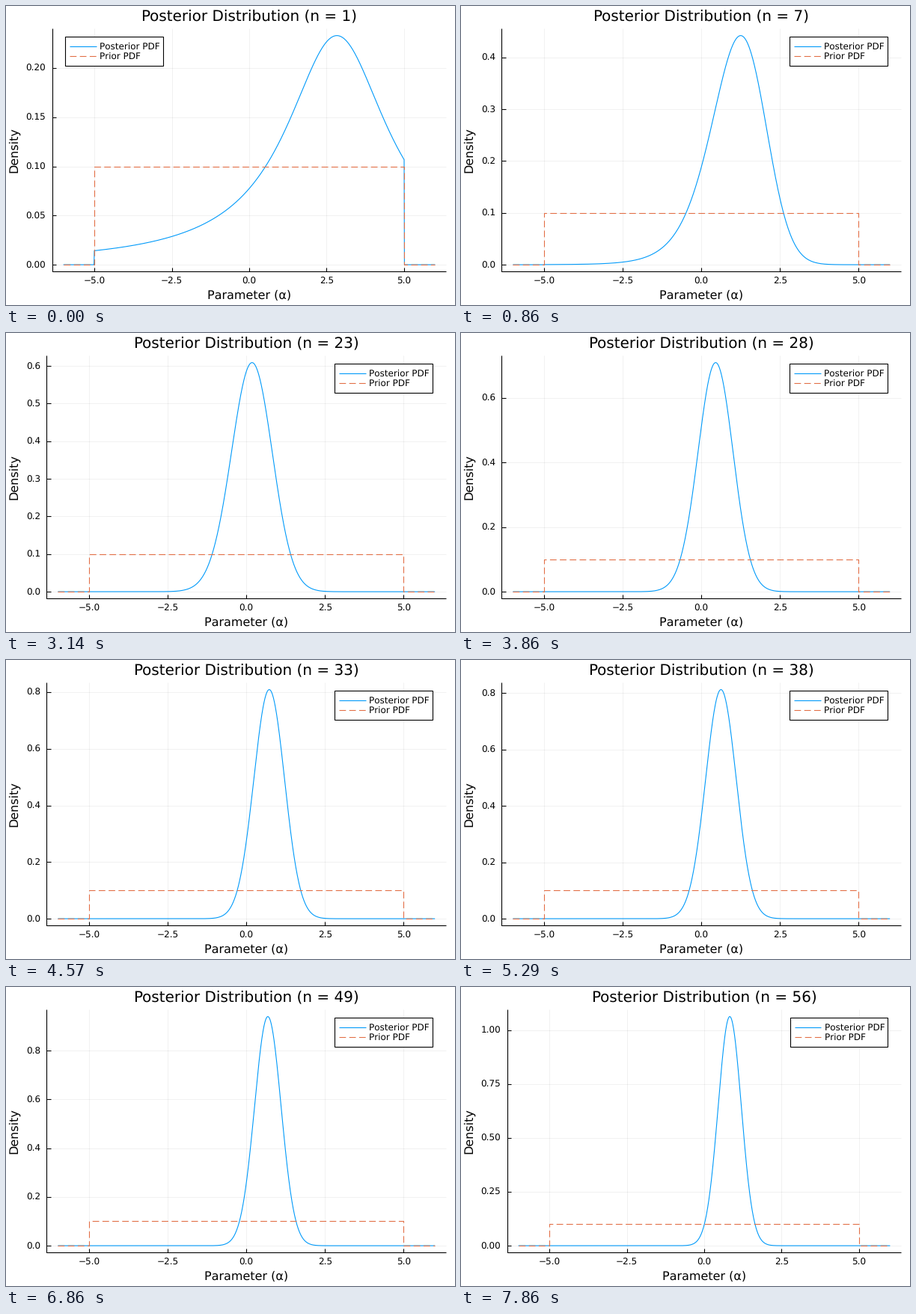
These frames come from a looping animation (600 by 400 pixels, 8000 ms). A matplotlib script:

```python
import numpy as np
import matplotlib as mpl
import matplotlib.pyplot as plt
from matplotlib.animation import FuncAnimation
from matplotlib.patches import Rectangle

W, H, DPI = 600, 400, 100
TICK_MS, TICKS = 50, 160
RATE = 7  # observations per second
TOP, BOTTOM, RIGHT = 30.4, 355.3, 588.3
PAD = 0.03
BLUE, ORANGE = "#009AFA", "#E26F46"
DASH = (0, (8, 4))

# where the posterior peaks after some of the observations
SEEN = [1, 7, 15, 23, 33, 42, 56]
MODE = [2.83, 1.25, 0, 0.18, 0.727, 0.54, 0.825]
PEAK = [0.233, 0.442, 0.652, 0.609, 0.809, 0.816, 1.063]

X = np.linspace(-6, 6, 1201)
INSIDE = np.abs(X) < 5.0001

mpl.rcParams["font.family"] = "DejaVu Sans"
mpl.rcParams["text.hinting"] = "none"
mpl.rcParams["text.hinting_factor"] = 1

fig = plt.figure(figsize=(W / DPI, H / DPI), dpi=DPI, facecolor="white")
ax = fig.add_axes([0, 0, 1, 1])


def pt(px):
    return px * 72 / DPI


def line(x, y, color="black", width=1.1, **kw):
    kw.setdefault("solid_capstyle", "butt")
    ax.plot(x, y, color=color, lw=pt(width), **kw)


def text(x, y, s, px=11.8, ha="center", **kw):
    ax.text(x, y, s, fontsize=pt(px), ha=ha, va="baseline", **kw)


def posterior(n):
    """Heavy-tailed density on [-5, 5], scaled to the wanted peak."""
    mode, peak = np.interp(n, SEEN, MODE), np.interp(n, SEEN, PEAK)
    skew = 3.4 * (n - 1) / n ** 2.5
    d = X - mode
    shape = d ** 2 * np.exp(skew * d)
    tail = 2 * n - 1
    a = 0.25
    for _ in range(40):
        p = np.where(INSIDE, (1 + a * shape / tail) ** -tail, 0)
        p /= p.sum() * (X[1] - X[0])
        a *= (peak / p.max()) ** 2
    return p, mode


def tick_step(upper):
    """Weigh a count near five against the roundness of the step."""
    cost = {0.25: 5, 0.2: 3, 0.1: 0, 0.05: 1}
    return min(cost, key=lambda s: cost[s] + 2 * abs(int(upper / s) - 4))


def legend(left):
    y = TOP + (BOTTOM - TOP) / 30 - 0.3
    ax.add_patch(Rectangle((left, y), 130.5, 39, fc="white", ec="black",
                           lw=pt(1.1), zorder=5))
    rows = [("Posterior PDF", BLUE, "-"), ("Prior PDF", ORANGE, DASH)]
    for i, (name, color, style) in enumerate(rows, 1):
        row = y + i * 13
        line([left + 6, left + 41.5], [row, row], color, ls=style, zorder=6)
        text(left + 46, row + 4.3, name, 11.65, ha="left", zorder=6)


def plot(n):
    p, mode = posterior(n)
    peak = p.max()
    upper = peak * (1 + PAD)
    step = tick_step(upper)
    digits = 1 if step in (0.1, 0.2) else 2
    left = 46.7 + 7.5 * digits - 7.5 + 7.5
    width = RIGHT - left
    mid = (left + RIGHT) / 2

    def px(x):
        return mid + x / 12 * width / (1 + 2 * PAD)

    def py(y):
        return BOTTOM - (y / peak + PAD) / (1 + 2 * PAD) * (BOTTOM - TOP)

    ax.clear()
    ax.set(xlim=(0, W), ylim=(H, 0))
    ax.axis("off")

    for v in np.arange(-5, 5.1, 2.5):
        x = px(v)
        line([x, x], [TOP, BOTTOM], width=1, alpha=0.055)
        line([x, x], [BOTTOM, BOTTOM - 5.3])
        text(x, 371.5, f"{v:.1f}".replace("-", "\u2212"))
    for v in np.arange(0, upper, step):
        y = py(v)
        line([left, RIGHT], [y, y], width=1, alpha=0.055)
        line([left, left + 5.3], [y, y])
        text(left - 8.4, y + 4.3, f"{v:.{digits}f}", ha="right")
    line([left, left, RIGHT], [TOP, BOTTOM, BOTTOM])

    line(px(X), py(p), BLUE, zorder=3)
    prior_x = np.array([-6, -5, -5, 5, 5, 6])
    prior_y = np.array([0, 0, 0.1, 0.1, 0, 0])
    line(px(prior_x), py(prior_y), ORANGE, ls=DASH, zorder=4)

    text(mid, 19.1, f"Posterior Distribution (n = {n})", 20.45)
    text(mid, 392.2, "Parameter (α)", 16.25)
    text(15.4, (TOP + BOTTOM) / 2, "Density", 16.15, rotation=90,
         rotation_mode="anchor")

    inset = width / 30
    legend(left + inset if mode > 2.2 else RIGHT - inset - 131)


def draw(frame):
    seconds = (frame + 0.9) * TICK_MS / 1000
    plot(1 + int(seconds * RATE))
    return []


anim = FuncAnimation(fig, draw, frames=TICKS, interval=TICK_MS,
                     repeat=True, repeat_delay=0, blit=False)
plt.show()
```
